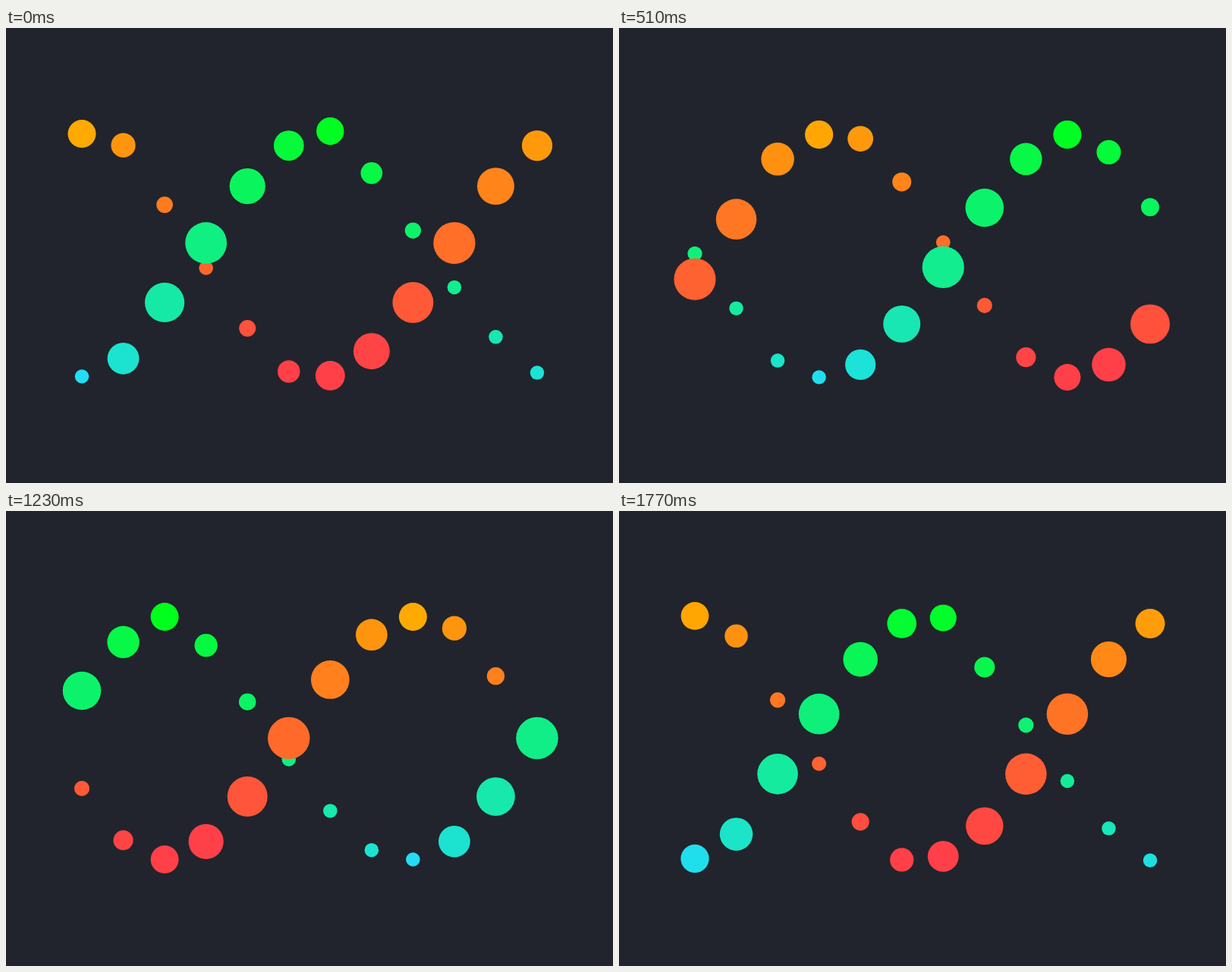
An HTML page with a canvas that plays this animation: 800 px wide and 600 px high, repeating every 1.8 s.

```html
<!DOCTYPE html>
<html lang="en">
<head>
<meta charset="utf-8">
<title>Dot helix</title>
<style>
html, body { margin: 0; width: 100%; height: 100%; overflow: hidden; background: #21242c; }
canvas { display: block; }
</style>
</head>
<body>
<canvas id="stage" width="800" height="600"></canvas>
<script>
const ctx = document.getElementById('stage').getContext('2d');
const STEP = 30, PERIOD = 60, COLUMNS = 12;
const TOP = 139.5, BOTTOM = 459.5, OVERSHOOT = 5, SIZE = 18.5;
const YELLOW = [255, 170, 0], RED = [255, 64, 72];
const CYAN = [34, 221, 244], GREEN = [0, 255, 28];

const lerp = (a, b, k) => a + (b - a) * k;
const smooth = k => k * k * (3 - 2 * k);
const mix = (from, to, k) => `rgb(${from.map((v, i) => Math.round(lerp(v, to[i], k)))})`;

// Cubic Bézier ease (1/3, 0, 5/6, 1): soft start, sharper stop.
function skew(k) {
  let lo = 0, hi = 1;
  for (let i = 0; i < 24; i++) {
    const s = (lo + hi) / 2;
    const x = s * (1 - s) ** 2 + 2.5 * s * s * (1 - s) + s ** 3;
    if (x < k) lo = s; else hi = s;
  }
  return smooth(lo);
}

const fall = k => lerp(TOP, BOTTOM, smooth(k));

// Rising path dips past both ends; k is the progress along its length.
function rise(k) {
  const length = BOTTOM - TOP + 4 * OVERSHOOT;
  const d = length * k;
  if (d < OVERSHOOT) return BOTTOM + d;
  if (d > length - OVERSHOOT) return TOP - (length - d);
  return BOTTOM + 2 * OVERSHOOT - d;
}

function warmDot(q) {
  let scale;
  if (q < 15) scale = lerp(1, 1.5, smooth(q / 15));
  else if (q < 45) scale = 1 + 0.5 * Math.cos((q - 15) / 30 * Math.PI);
  else scale = lerp(0.5, 1, smooth((q - 45) / 15));
  const heat = Math.min(1, Math.min(q, PERIOD - q) / 25);
  return {
    y: q < 30 ? fall(q / 30) : rise(smooth((q - 30) / 30)),
    r: SIZE * scale,
    color: mix(YELLOW, RED, heat)
  };
}

function coolDot(q) {
  let scale;
  if (q < 15) scale = 0.5;
  else if (q < 30) scale = lerp(0.5, 1, skew((q - 15) / 15));
  else if (q < 45) scale = lerp(1, 1.5, skew((q - 30) / 15));
  else scale = lerp(1.5, 1, smooth((q - 45) / 15));
  return {
    y: q < 30 ? rise(skew(q / 30)) : fall((q - 30) / 30),
    r: SIZE * scale,
    color: mix(CYAN, GREEN, Math.min(q, PERIOD - q) / 30)
  };
}

function draw(time) {
  const tick = Math.floor(time / STEP + 0.03) % PERIOD;
  ctx.fillStyle = '#21242c';
  ctx.fillRect(0, 0, 800, 600);
  for (let c = 0; c < COLUMNS; c++) {
    const delay = 5 * c + (c > 1 ? 1 : 0);
    const q = (tick - delay + PERIOD) % PERIOD;
    const x = 100 + c * 600 / (COLUMNS - 1);
    // The larger dot is nearer, so it goes on top.
    for (const dot of [warmDot(q), coolDot(q)].sort((a, b) => a.r - b.r)) {
      ctx.fillStyle = dot.color;
      ctx.beginPath();
      ctx.arc(x, dot.y, dot.r, 0, Math.PI * 2);
      ctx.fill();
    }
  }
}

function loop() {
  draw(performance.now());
  requestAnimationFrame(loop);
}
loop();
</script>
</body>
</html>
```
